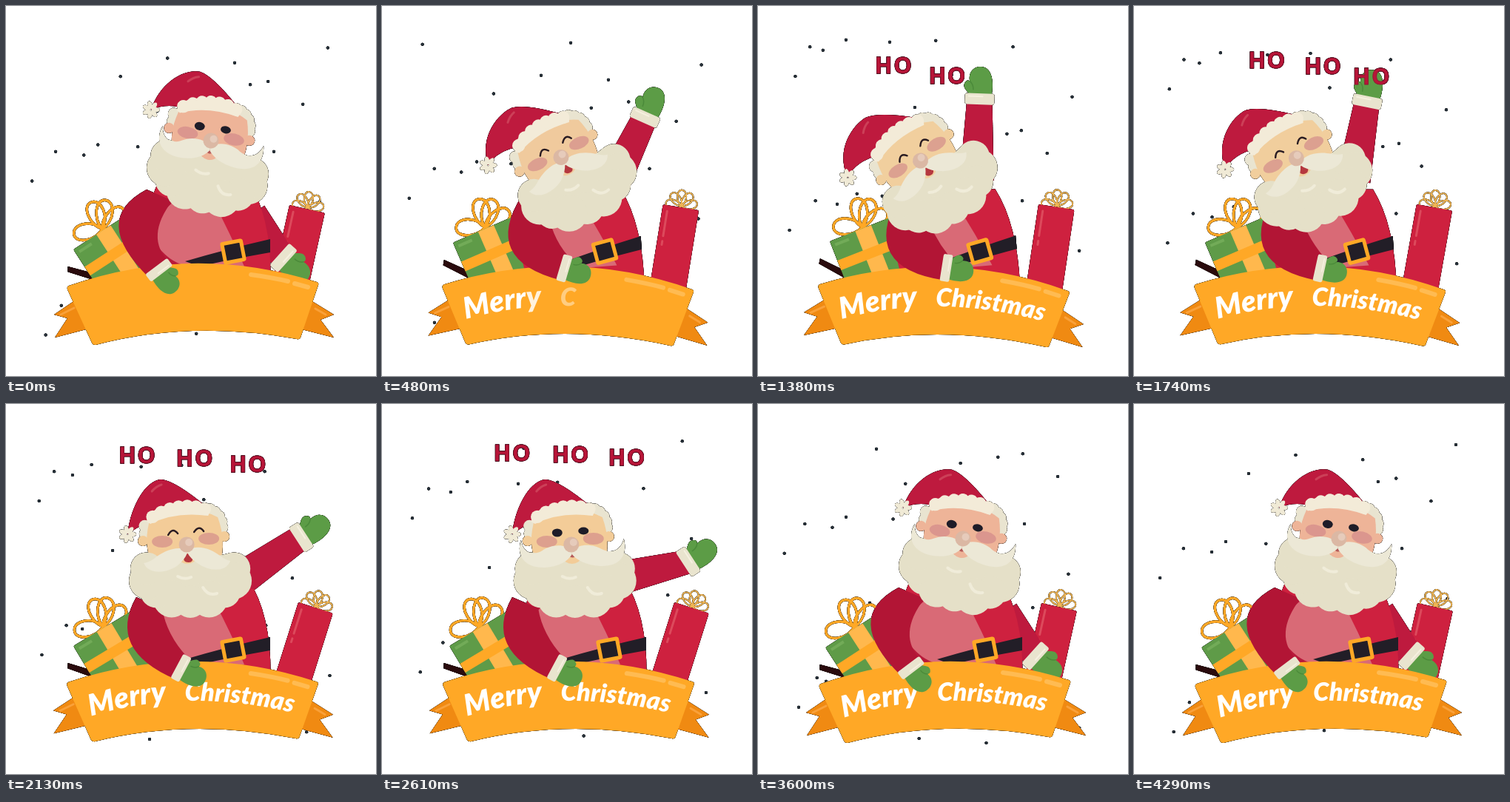
These frames come from a looping animation (500x500 px, 4.32 s). An HTML page:

```html
<!DOCTYPE html>
<html lang="en">
<head>
<meta charset="utf-8">
<title>Merry Christmas</title>
<style>
html, body { margin: 0; width: 100%; height: 100%; overflow: hidden; background: #fff }
svg { display: block; width: 100vw; height: 100vh }
#stage { filter: drop-shadow(0 0 .4px #000) drop-shadow(0 0 .4px #000) }
.ho { font: 700 31px "Open Sans", sans-serif; letter-spacing: 1.6px; fill: #b81538; stroke: #8d1230; stroke-width: .8; text-anchor: middle }
.script { font: italic 900 34px Lato, sans-serif; fill: #fff }
.line { fill: none; stroke-linecap: round; stroke-linejoin: round }
</style>
</head>
<body>
<svg viewBox="0 0 500 500">
<defs>
  <path id="loop" d="M0 0C12-15 40-14 39 0S12 15 0 0"/>
  <g id="mitten">
    <path fill="#5c9c46" d="M4-14C10-16 13-24 20-21Q26-18 23-14C36-17 44-8 43 2C42 15 24 19 4 16Z"/>
    <path class="line" stroke="#4b8a3a" stroke-width="1.5" d="M12-9Q19-9 23-14"/>
    <rect x="-8" y="-20" width="15" height="40" rx="3" fill="#e9e4ce"/>
    <path class="line" stroke="#f5f0df" stroke-width="2" d="M3-15V4"/>
  </g>
  <path id="arc" d="M116 424Q250 380 408 420"/>
</defs>
<g id="stage">
  <g id="snow" fill="#27313a"></g>

  <g id="giftR">
    <g class="line" id="bowR" stroke="#f0b655" stroke-width="3.4"></g>
    <rect width="49" height="115" rx="2" fill="#ce213f"/>
    <path class="line" stroke="#dc4a5c" stroke-width="3" d="M7 8V42M7 49V54"/>
  </g>
  <path id="stick" d="M0-2L42-3V6L2 5Z" fill="#2a0b0d"/>
  <g id="giftL">
    <g class="line" id="bowL" stroke="#ffa826" stroke-width="3.4"></g>
    <rect width="100" height="90" rx="2" fill="#5f9b48"/>
    <path fill="#72ab58" d="M5 5h20v4H5z"/>
    <path fill="#ffb84d" d="M37 0h23v90H37z"/>
    <path fill="#ffa826" d="M0 28h100v14H0z"/>
  </g>

  <path id="sleeveR" fill="#be1a3e"/>
  <use id="handR" href="#mitten"/>
  <g id="body">
    <path fill="#ce213f" d="M205 240Q180 290 205 385H357Q361 300 335 250Z"/>
    <path fill="#b81a3a" d="M212 262Q178 300 198 325Q215 352 245 352L255 340 225 262Z"/>
    <path fill="#d96a76" d="M230 262Q180 300 205 325Q225 350 250 352H322Q302 305 282 268Z"/>
    <path fill="#221e27" d="M242 345Q300 328 357 315V333Q300 343 262 352Z"/>
    <rect x="-13" y="-13" width="26" height="26" rx="1" fill="#221e27" stroke="#ffa826" stroke-width="5" transform="translate(307 332)rotate(-11)"/>
  </g>

  <g id="banner">
    <path fill="#f08a12" d="M93 398L65 417 83 422 66 448 112 436ZM412 398L443 417 425 424 443 448 396 436Z"/>
    <path class="line" stroke="#f9a13a" stroke-width="3" d="M74 417L92 408M432 417L418 409"/>
    <path fill="#ffa826" d="M85 378Q252 320 420 373Q423 374 422 377L398 448Q397 451 393 450Q250 424 121 458Q117 458 116 455L83 383Q82 379 85 378Z"/>
    <path class="line" stroke="#ffbb52" stroke-width="6" d="M331 363Q360 367 381 372M390 375L408 380"/>
    <text class="script" style="font-size:40px"><textPath href="#arc" data-word="Merry"/></text>
    <text class="script"><textPath href="#arc" startOffset="129" data-word="Christmas"/></text>
  </g>

  <path id="sleeveL" fill="#b21535"/>
  <use id="handL" href="#mitten"/>

  <g id="head">
    <path id="hat" fill="#be1a3e"/>
    <path class="line" stroke="#cc4058" stroke-width="3" d="M208 117Q214 110 221 108"/>
    <g id="pom" fill="#f0ead6"></g>
    <g id="hair" fill="#e9e4d0"></g>
    <g id="skin">
      <circle cx="196" cy="184" r="7"/><circle cx="306" cy="178" r="7"/>
      <path d="M204 160Q196 195 210 215H300Q309 185 297 152Q250 128 204 160Z"/>
    </g>
    <path fill="#f3ebd8" d="M201 158Q203 140 235 135Q270 128 286 146L284 150Q240 144 206 161Z"/>
    <g id="trim" fill="#f3ebd8"></g>
    <g fill="#cf8388" opacity=".6"><ellipse cx="222" cy="185" rx="14" ry="8"/><ellipse cx="285" cy="181" rx="14" ry="8"/></g>
    <g id="beard" fill="#e5e0c8"><path d="M195 202Q255 216 315 200L330 250 265 280 200 262Z"/></g>
    <path class="line" stroke="#f0ecd9" stroke-width="4" d="M243 232Q252 237 261 233M277 247Q284 259 296 255"/>
    <ellipse id="lip" cx="256" cy="206" rx="12" ry="9"/>
    <g id="awake">
      <g fill="#1e1c28"><ellipse cx="236" cy="173" rx="7" ry="5.5"/><ellipse cx="271.5" cy="170.5" rx="7" ry="5"/></g>
      <path fill="#b55a58" d="M250 203Q257 198 263 203Q257 210 250 203Z"/>
      <g fill="#ece8d6">
        <path d="M256 198C246 186 226 190 216 197C203 205 190 200 187 183C180 205 193 221 220 220C238 219 251 211 256 202Z"/>
        <path d="M256 198C266 186 286 189 296 195C309 202 322 197 326 181C332 204 320 219 294 218C276 217 262 210 256 202Z"/>
      </g>
    </g>
    <g id="laugh">
      <path class="line" stroke="#2a1c22" stroke-width="2.4" d="M230 176Q236 165 243 174M265 172Q272 162 278 171"/>
      <path fill="#b5383f" d="M250 203Q257 199 264 203Q264 214 257 213Q250 213 250 203Z"/>
      <path fill="#ece8d6" d="M256 196C240 190 222 199 211 208Q204 213 197 214C205 232 232 226 243 217Q252 210 256 200ZM256 196C272 188 290 196 300 204Q308 210 314 211C307 229 282 223 271 215Q260 208 256 200Z"/>
    </g>
    <circle cx="255" cy="189" r="10.5" fill="#dbb8a4"/>
    <circle cx="258" cy="186" r="5" fill="#e6cbbb"/>
  </g>
  <text class="ho">HO</text><text class="ho">HO</text><text class="ho">HO</text>
</g>
</svg>
<script>
const LOOP = 4320, STEP = 30, NS = 'http://www.w3.org/2000/svg';
const $ = id => document.getElementById(id);
const set = (el, attrs) => { for (const k in attrs) el.setAttribute(k, attrs[k]); return el; };
const add = (parent, tag, attrs) => parent.appendChild(set(document.createElementNS(NS, tag), attrs));
const place = (id, x, y, r, more = '') => set($(id), { transform: `translate(${x} ${y})rotate(${r})${more}` });
const clamp = v => Math.max(0, Math.min(1, v));
const ease = (t, from, to) => { const u = clamp((t - from) / (to - from)); return u * u * (3 - 2 * u); };
const polar = (x, y, deg, rx, ry = rx) => [x + rx * Math.cos(deg * Math.PI / 180), y + ry * Math.sin(deg * Math.PI / 180)];
const range = n => [...Array(n).keys()];
const circle = (id, [cx, cy], r) => add($(id), 'circle', { cx, cy, r });

// Three poses per part: at rest, leaning, waving
const poses = {
  // nose, tilt, pompom offset
  head: [[277, 182, 12, -88, -24], [225, 209, -31, -96, -31], [250, 190, 0, -80, -14]],
  skin: [[238, 180, 152], [241, 207, 158], [243, 204, 152]],
  // shoulder, elbow, wrist, hand angle
  armL: [[190, 248, 113, 289, 207, 357, 53], [189, 258, 138, 354, 255, 354, 9], [176, 261, 136, 332, 237, 357, 28]],
  // shoulder, length, arm angle, hand angle
  armR: [[331, 284, 72, 52, 42], [300, 235, 110, -88, -88], [318, 236, 99, -24, -33]],
  giftL: [[91, 329, -33], [97, 318, -21.5], [91, 327, -31]],
  giftR: [[383, 269, 12.5], [379, 268, 8.5], [395, 268, 17.5]],
  banner: [[0, 0, 0], [-3, 5, 2.4], [-1, 0, .8]]
};

// Fixed details
range(9).forEach(i => circle('beard', polar(260, 228, 25 * i - 10, 60, 38), 22 + 3 * (i % 2)));
range(7).forEach(i => circle('trim', [209 + 11.7 * i, 137 + .9 * (i - 4) ** 2], 8.7));
range(5).forEach(i => circle('hair', polar(278, 165, 18 * i - 70, 25), 8));
range(2).forEach(i => circle('hair', polar(222, 168, 165 + 25 * i, 24), 8));
range(7).forEach(i => add($('pom'), 'ellipse', { cx: 6.5, rx: 5.5, ry: 3.2, transform: `rotate(${i * 360 / 7})` }));
const bow = (id, x, size, angles) => angles.forEach(a =>
  add($(id), 'use', { href: '#loop', transform: `translate(${x} -2)rotate(${a})scale(${size})` }));
bow('bowL', 48, 1, [203, 281, 310, 350]);
bow('bowR', 25, .55, range(5).map(i => 183 + 40 * i));
const letters = [...document.querySelectorAll('textPath')].flatMap(path =>
  [...path.dataset.word].map(ch => {
    const span = add(path, 'tspan', {});
    span.textContent = ch;
    return span;
  }));
const hos = [...document.querySelectorAll('.ho')];

// Each flake falls half the height per loop, where its twin takes over
let seed = 7;
const random = () => (seed = seed * 16807 % 2147483647) / 2147483647;
const TOP = 45, FALL = 208, PATHS = 17;
const flakes = range(PATHS).flatMap(i => {
  const x = 45 + 385 * (i + random()) / PATHS, y = random() * FALL, phase = random() * 6;
  return [y, y + FALL].map(y => ({ x, y, phase, dot: circle('snow', [x, y], 2) }));
});

function draw(t) {
  const up = ease(t, 0, 650), out = ease(t, 1600, 2130), back = ease(t, 2750, 3450);
  const lean = up * (1 - out), wave = out * (1 - back), rest = 1 - lean - wave;
  const pose = name => poses[name][0].map((v, i) =>
    v * rest + poses[name][1][i] * lean + poses[name][2][i] * wave);
  const sway = 10 * (1 - rest) * Math.cos(2 * Math.PI * (t - 550) / 2430);

  for (const { x, y, phase, dot } of flakes) {
    const fall = (y + FALL * t / LOOP) % (2 * FALL);
    set(dot, { cx: x + 10 * Math.sin(fall / 60 + phase), cy: TOP + fall });
  }

  const [gx, gy, gr] = pose('giftL');
  place('giftL', gx, gy, gr);
  place('stick', 83, gy + 25, gr + 49);
  place('giftR', ...pose('giftR'));
  const [bx, by, br] = pose('banner');
  place('banner', bx + 254, by + 417, br, 'translate(-254 -417)');
  letters.forEach((el, i) => set(el, { 'fill-opacity': clamp((t - 150 - i * 55) / 130) }));

  const [hx, hy, tilt, px, py] = pose('head');
  place('head', hx + sway, hy, tilt, 'translate(-255 -189)');
  place('body', 300 - 3 * lean, 380, -5 * lean, 'translate(-300 -380)');
  const x = 255 + px, y = 189 + py;
  place('pom', x, y, -tilt);
  set($('hat'), { d: `M282 138Q240 103 221 101C202 101 ${x + 5} ${y - 42} ${x} ${y}Q${x + 20} ${y - 14} 212 154Z` });
  const fill = `rgb(${pose('skin').map(Math.round)})`;
  set($('skin'), { fill });
  set($('lip'), { fill });
  const laughing = t >= 420 && t < 2340;
  set($('laugh'), { display: laughing ? 'inline' : 'none' });
  set($('awake'), { display: laughing ? 'none' : 'inline' });

  const [sx, sy, ex, ey, wx, wy, wa] = pose('armL');
  set($('sleeveL'), { d: `M${sx} ${sy}Q${ex} ${ey} ${polar(wx, wy, wa + 90, 17)}L${polar(wx, wy, wa - 90, 17)}Q${wx - 20} ${wy - 45} ${sx + 35} ${sy + 15}Z` });
  place('handL', wx, wy, wa, 'scale(.85 .92)');

  const [ax, ay, len, angle, hand] = pose('armR');
  const sh = ax + .8 * sway * lean, dir = angle + 1.8 * sway * wave, [rx, ry] = polar(sh, ay, dir, len);
  set($('sleeveR'), { d: `M${polar(sh, ay, dir + 90, 23)}L${polar(rx, ry, hand + 90, 17)} ${polar(rx, ry, hand - 90, 17)} ${polar(sh, ay, dir - 90, 23)}Z` });
  place('handR', rx, ry, hand);

  // Each laugh rises and slows down, spreading outwards
  hos.forEach((el, i) => {
    const age = t - 670 - i * 390, drop = 50 * Math.exp(-.0015 * Math.max(0, age));
    set(el, {
      x: 175 + 80 * i + (.5 - .46 * i) * drop, y: 74 + drop,
      opacity: clamp(age / 120) * clamp((3060 - t) / 180)
    });
  });
}

function tick(now) {
  draw(Math.floor(now % LOOP / STEP) * STEP);
  requestAnimationFrame(tick);
}
tick(0);
</script>
</body>
</html>
```
